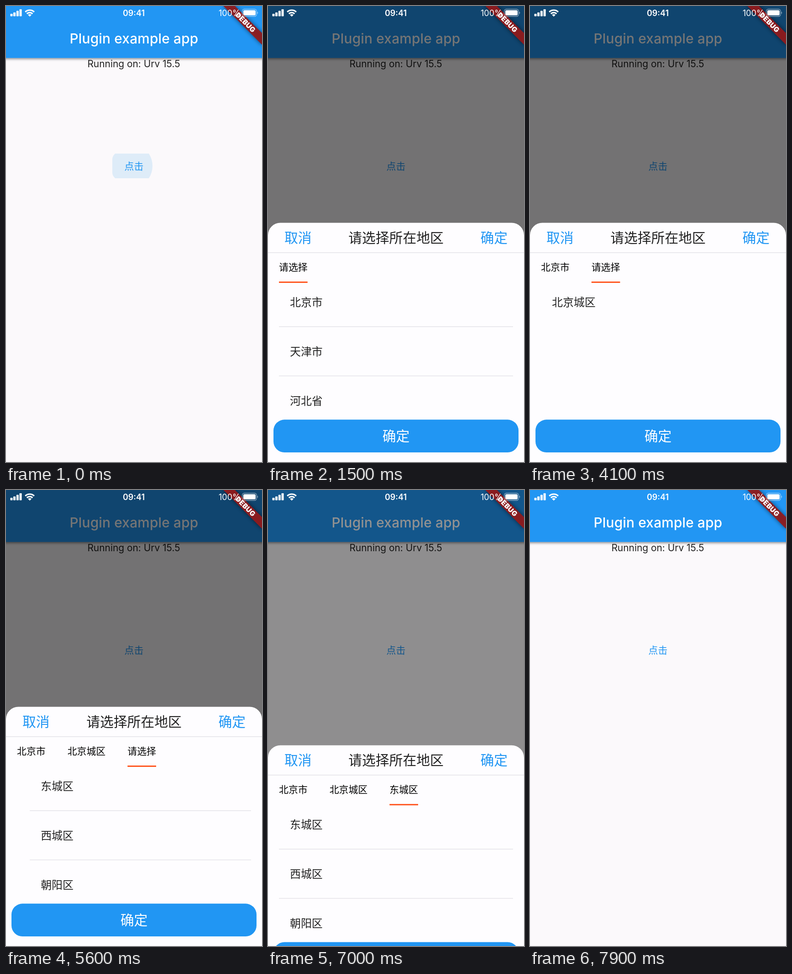
These frames come from a looping animation (561 by 998 pixels, 8000 ms). An HTML page:

```html
<!DOCTYPE html>
<html lang="zh-CN">
<head>
<meta charset="utf-8">
<style>
  html, body { margin: 0; width: 100%; height: 100%; overflow: hidden; background: #fbf9fb; }
  svg { display: block; width: 100%; height: 100%; }
  text { font-family: Inter, "Noto Sans CJK SC", "Noto Sans CJK", sans-serif; fill: #212121; white-space: pre; }
  .mid { text-anchor: middle; }
  .end { text-anchor: end; }
  .big { font-size: 29.8px; }
  .item { font-size: 23.9px; }
  .small { font-size: 20.9px; }
  .tab { fill: #000; }
  .blue { fill: #2196f3; }
  .white { fill: #fff; }
  .rule { fill: #e4e3e8; }
</style>
</head>
<body>
<svg viewBox="0 0 561 998">
  <defs>
    <filter id="drop" x="-5%" y="-10%" width="110%" height="130%">
      <feDropShadow dx="0" dy="2.5" stdDeviation="2.6" flood-opacity=".42"/>
    </filter>
    <filter id="blur" x="-30%" y="-150%" width="160%" height="400%"><feGaussianBlur stdDeviation="3.2"/></filter>
    <clipPath id="view"><rect x="24" y="607" width="513" height="299"/></clipPath>
  </defs>

  <rect width="561" height="998" fill="#fbf9fb"/>
  <rect x="-20" y="-20" width="601" height="133.7" class="blue" filter="url(#drop)"/>
  <text x="280.5" y="82" class="mid big white" font-weight="500" letter-spacing=".2">Plugin example app</text>
  <text x="280" y="133.5" class="mid small">Running on: Urv 15.5</text>
  <path id="press" fill="#deecf8" d="M239 323H313A49.5 49.5 0 0 1 313 377H239Q233 371 233 365V335Q233 329 239 323Z"/>
  <text x="280.5" y="357.5" class="mid small blue">点击</text>

  <rect id="shade" width="561" height="998"/>

  <g id="sheet">
    <path d="M0 1000V501.5A27 27 0 0 1 27 474.5H534A27 27 0 0 1 561 501.5V1000Z" fill="#fefdff"/>
    <text x="36" y="518" class="big blue">取消</text>
    <text x="280.5" y="518" class="big mid">请选择所在地区</text>
    <text x="525" y="518" class="big blue end">确定</text>
    <rect y="539" width="561" height="1.5" class="rule"/>
    <g id="tabs"></g>
    <rect id="line" y="603" height="3" fill="#ff5722"/>
    <g clip-path="url(#view)"><g id="pages"></g></g>
    <rect x="12" y="905.3" width="537" height="71.8" rx="24" class="blue"/>
    <text x="280.5" y="952" class="big mid white">确定</text>
  </g>

  <g transform="translate(561) scale(1.496) rotate(45)">
    <rect x="-40" y="28" width="80" height="12" opacity=".55" filter="url(#blur)"/>
    <rect x="-60" y="28" width="120" height="12" fill="#941b1d" opacity=".92"/>
    <text x="0" y="37.7" class="mid white" font-size="10.2" font-weight="900" letter-spacing=".2">DEBUG</text>
  </g>

  <g class="white">
    <rect x="9.5" y="17" width="5" height="5.5" rx="1.2"/>
    <rect x="16" y="14" width="5" height="8.5" rx="1.2"/>
    <rect x="22.8" y="10.5" width="5" height="12" rx="1.2"/>
    <rect x="29.5" y="7" width="5" height="15.5" rx="1.2"/>
    <g fill="none" stroke="#fff" stroke-width="3.2">
      <path d="M42.2 13A14 14 0 0 1 61.8 13"/>
      <path d="M45.8 17A8.8 8.8 0 0 1 58.2 17"/>
    </g>
    <path d="M52 23.2L48.2 19.4A5.4 5.4 0 0 1 55.8 19.4Z"/>
    <text x="280" y="21.7" class="mid white" font-size="18" font-weight="600">09:41</text>
    <text x="466" y="21.7" class="white" font-size="18">100%</text>
    <rect x="517.7" y="7" width="31.5" height="15.8" rx="4.5" fill="none" stroke="#fff" stroke-opacity=".5" stroke-width="1.4"/>
    <rect x="520" y="9.3" width="27" height="11.2" rx="2.6"/>
    <path d="M550.6 12.2A3 3 0 0 1 550.6 17.6Z" opacity=".5"/>
  </g>
</svg>
<script>
const $ = id => document.getElementById(id);
const LOOP = 8000, STEP = 100, PAGE = 513, EM = 20.9, SHEET = 523.5;
const lists = [["北京市", "天津市", "河北省"], ["北京城区"], ["东城区", "西城区", "朝阳区"]];
const clamp = v => Math.min(1, Math.max(0, v));

function bezier(x1, y1, x2, y2) {
  const at = (a, b, s) => 3 * a * s * (1 - s) ** 2 + 3 * b * s * s * (1 - s) + s ** 3;
  return x => {
    let lo = 0, hi = 1;
    for (let i = 0; i < 24; i++) {
      const m = (lo + hi) / 2;
      if (at(x1, x2, m) < x) lo = m; else hi = m;
    }
    return x <= 0 ? 0 : x >= 1 ? 1 : at(y1, y2, lo);
  };
}
const ease = bezier(.25, .1, .25, 1);
const decelerate = bezier(0, 0, .2, 1);

$("pages").innerHTML = lists.map((names, p) => names.map((name, i) => {
  const x = 24 + p * PAGE, y = 657 + i * 107.8;
  const rule = i < names.length - 1 ? `<rect x="${x}" y="${y + 44}" width="${PAGE}" height="1.5" class="rule"/>` : "";
  return `<text x="${x + 24}" y="${y}" class="item">${name}</text>${rule}`;
}).join("")).join("");

let shown = "";
function setTabs(names) {
  if (names.join() === shown) return;
  shown = names.join();
  let x = 24, html = "";
  names.forEach((name, i) => {
    const w = name.length * EM;
    html += `<text x="${x}" y="579.3" class="small tab">${name}</text>`;
    if (i === names.length - 1) {
      $("line").setAttribute("x", x);
      $("line").setAttribute("width", w);
    }
    x += w + 48;
  });
  $("tabs").innerHTML = html;
}

function draw(now) {
  // The screen refreshes ten times a second.
  const t = Math.floor((now % LOOP) / STEP) * STEP;
  const open = t < 300 ? 0 : 1 - clamp((t - 6900) / 200);
  const page = ease(clamp((t - 3687) / 300)) + ease(clamp((t - 5387) / 300));

  $("press").style.display = t < 300 ? "" : "none";
  $("shade").setAttribute("opacity", .54 * ease(open));
  $("sheet").setAttribute("transform", `translate(0 ${SHEET * (1 - decelerate(open))})`);
  $("sheet").style.display = open ? "" : "none";
  $("pages").setAttribute("transform", `translate(${-PAGE * page} 0)`);

  const picked = [];
  if (t >= 3700) picked.push("北京市");
  if (t >= 5400) picked.push("北京城区");
  setTabs([...picked, t >= 6700 ? "东城区" : "请选择"]);
}

const start = performance.now();
function tick() {
  draw(performance.now() - start);
  requestAnimationFrame(tick);
}
tick();
</script>
</body>
</html>
```
